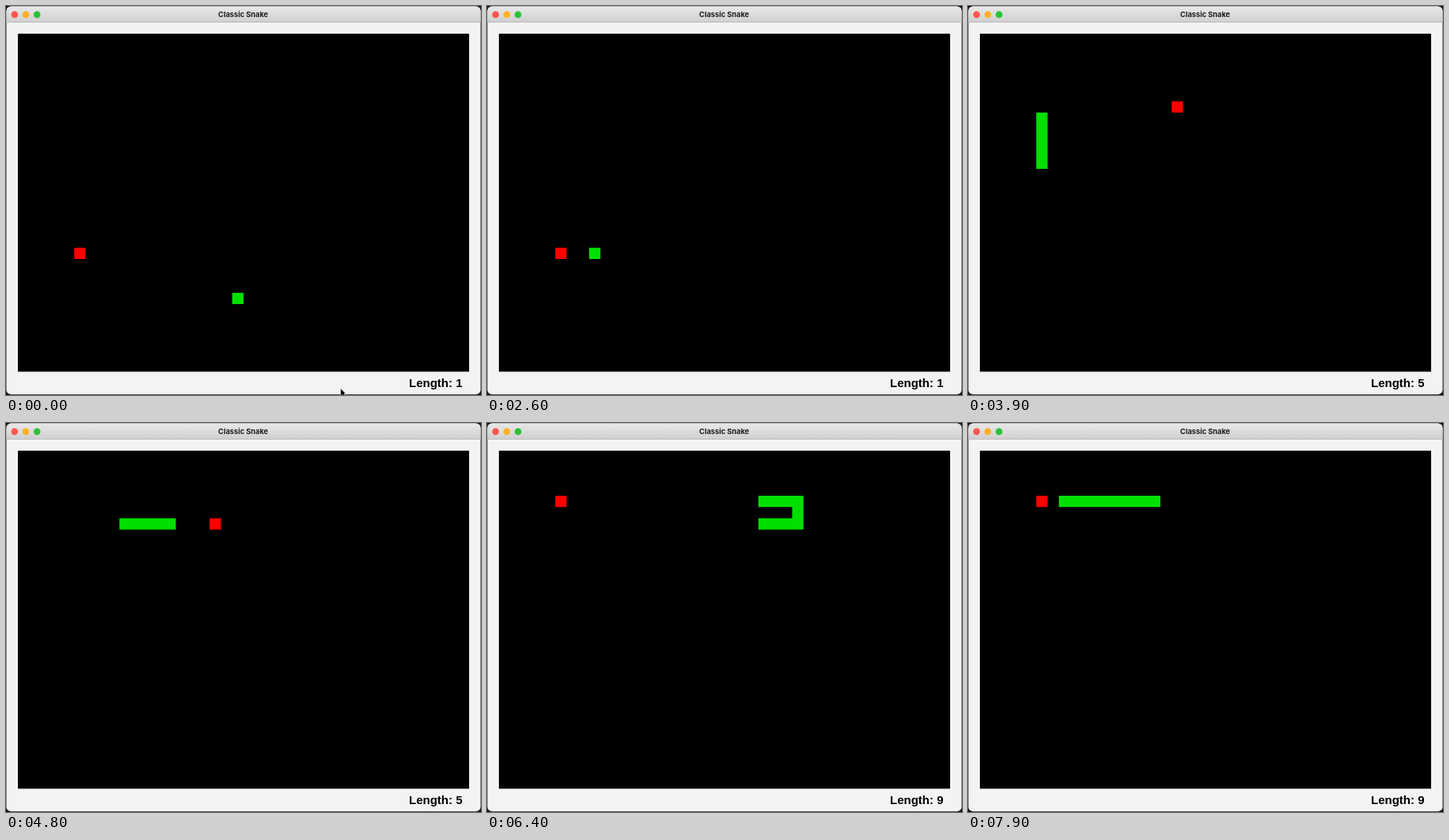
Recreate the animation shown at these times as an HTML page. Size 600x492 px, loop 8 s.

```html
<!DOCTYPE html>
<html lang="en">
<head>
<meta charset="utf-8">
<title>Classic Snake</title>
<style>
  html, body { margin: 0; width: 100%; height: 100%; overflow: hidden; background: #161616; }
  svg { display: block; width: 600px; height: 492px; }
  .title { font: 700 9.25px Inter, "Open Sans", sans-serif; fill: #1d1d1d; }
  .score { font: 700 15px "Liberation Sans", Arial, sans-serif; fill: #000; }
</style>
</head>
<body>
<svg viewBox="0 0 600 492">
  <defs>
    <linearGradient id="bar" x2="0" y2="1">
      <stop offset="0" stop-color="#e9e9e9"/>
      <stop offset="1" stop-color="#cfcfcf"/>
    </linearGradient>
    <clipPath id="frame"><rect x=".5" y=".5" width="599" height="490.7" rx="6"/></clipPath>
  </defs>
  <rect width="600" height="492" fill="#161616"/>
  <g clip-path="url(#frame)">
    <rect width="600" height="492" fill="#f3f3f3"/>
    <rect width="600" height="20.5" fill="url(#bar)"/>
    <rect y="20" width="600" height=".8" fill="#b4b4b4"/>
  </g>
  <circle cx="10.8" cy="10.9" r="4.3" fill="#fc5650"/>
  <circle cx="25" cy="10.9" r="4.3" fill="#fcb02a"/>
  <circle cx="39.2" cy="10.9" r="4.3" fill="#2ac337"/>
  <text class="title" x="299.6" y="13.7" text-anchor="middle">Classic Snake</text>
  <rect x="15" y="35" width="570" height="427.5"/>
  <rect id="apple" width="14.25" height="14.25" fill="#f00"/>
  <path id="snake" fill="none" stroke="#00e000" stroke-width="14.25" stroke-linecap="square" stroke-linejoin="miter"/>
  <text id="score" class="score" x="509" y="481.6"></text>
  <path id="pointer" d="M422.6 483.6V493.5L424.8 491.5L426 494L428 493L426.9 490.6H429.3Z" stroke="#fff" stroke-width=".6"/>
</svg>
<script>
const LOOP = 8000, FRAME = 100;
const CELL = 14.25, LEFT = 15, TOP = 35;
const FIRST = 1120, TICK = 92.6, GROW = 4;

// Runs of moves: dx, dy, count
const runs = [[0, -1, 4], [-1, 0, 14], [0, -1, 13], [1, 0, 21], [0, -1, 2], [-1, 0, 19]];
const apples = [[5, 19], [17, 6], [5, 4]];

const trail = [[19, 23]];
for (const [dx, dy, n] of runs) {
  for (let i = 0; i < n; i++) {
    const [x, y] = trail[trail.length - 1];
    trail.push([x + dx, y + dy]);
  }
}

// Move numbers at which the head reaches the first two apples
const meals = apples.slice(0, 2).map(([ax, ay]) =>
  trail.findIndex(([x, y]) => x === ax && y === ay));

const el = id => document.getElementById(id);
const [apple, snake, score, pointer] = ["apple", "snake", "score", "pointer"].map(el);
const px = x => LEFT + x * CELL;
const py = y => TOP + y * CELL;

function draw(time) {
  const t = Math.floor(time % LOOP / FRAME) * FRAME;
  const move = Math.min(trail.length - 1, Math.max(0, Math.floor((t - FIRST) / TICK)));
  const eaten = meals.filter(m => m <= move).length;

  // The score jumps at once; the body gains one cell per move
  const size = meals.reduce((n, m) => n + Math.max(0, Math.min(GROW, move - m)), 1);
  const body = trail.slice(Math.max(0, move - size + 1), move + 1);
  const points = body.map(([x, y]) => `${px(x + .5)} ${py(y + .5)}`);
  snake.setAttribute("d", `M${points.join("L")}${size === 1 ? "h0" : ""}`);

  const [ax, ay] = apples[eaten];
  apple.setAttribute("x", px(ax));
  apple.setAttribute("y", py(ay));
  score.textContent = `Length: ${1 + GROW * eaten}`;
  pointer.style.display = t < FRAME ? "" : "none";
}

let start;
function tick(now) {
  start ??= now;
  draw(now - start);
  requestAnimationFrame(tick);
}
draw(0);
requestAnimationFrame(tick);
</script>
</body>
</html>
```
